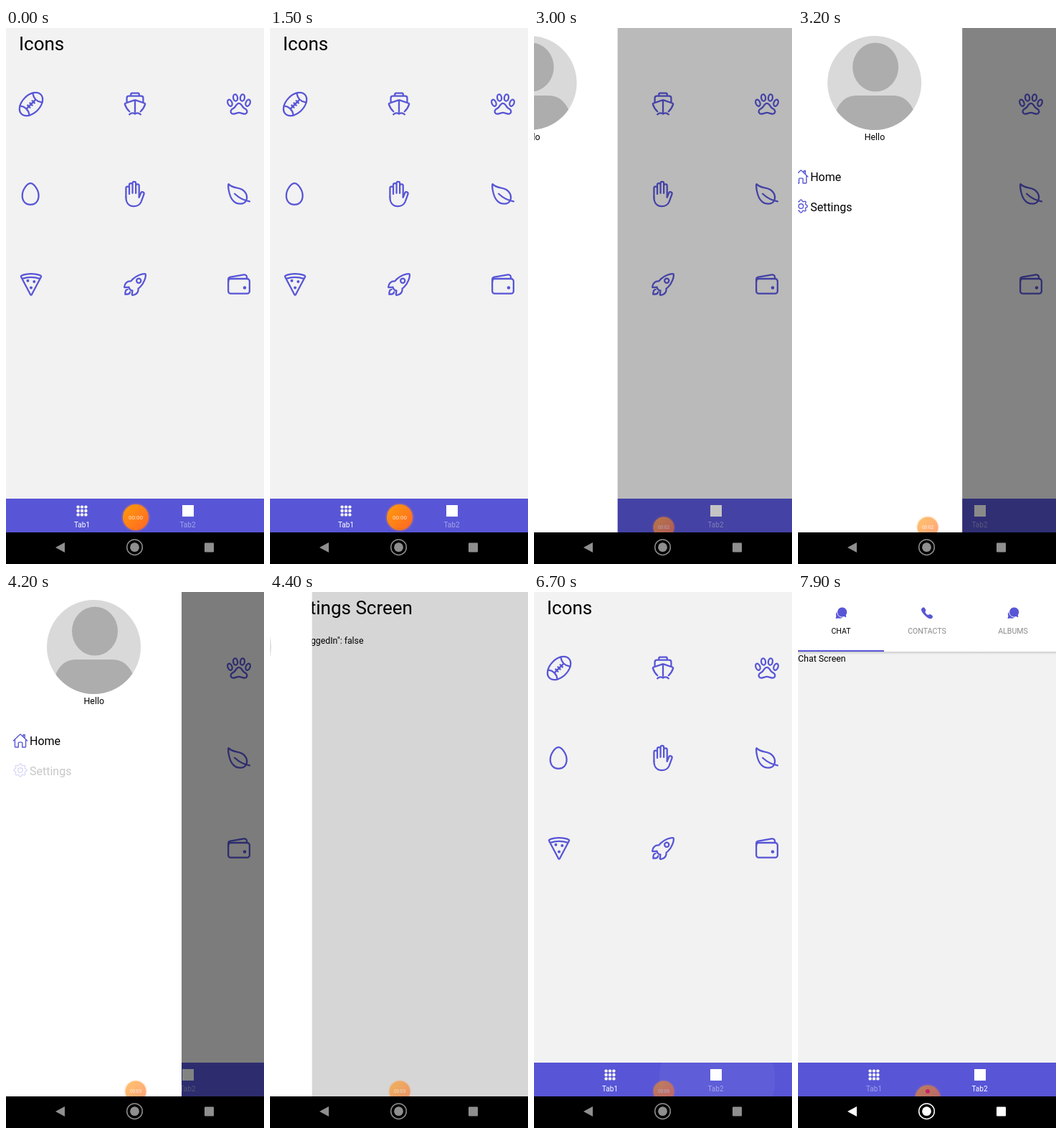
An HTML page that plays this animation: 360x746 px, repeating every 8000 ms.

```html
<!DOCTYPE html>
<html lang="en">
<head>
<meta charset="utf-8">
<title>App tour</title>
<style>
  html, body { margin: 0; width: 100%; height: 100%; overflow: hidden; background: #000; }
  svg { display: block; font-family: Roboto, sans-serif; }
  text { white-space: pre; }
  .icon { fill: none; stroke: #5856d6; stroke-width: 32; stroke-linecap: round; stroke-linejoin: round; }
  .dot { fill: #5856d6; stroke: none; }
  .mid { text-anchor: middle; }
</style>
</head>
<body>
<svg width="360" height="746" viewBox="0 0 360 746">
  <defs>
    <linearGradient id="orange" x1="0" y1="0" x2="1" y2="1">
      <stop offset="0" stop-color="#ff9d0a"/><stop offset="1" stop-color="#ff6526"/>
    </linearGradient>
    <linearGradient id="shade" x1="0" y1="0" x2="0" y2="1">
      <stop offset="0" stop-color="#000" stop-opacity=".16"/><stop offset="1" stop-color="#000" stop-opacity="0"/>
    </linearGradient>
    <clipPath id="app"><rect width="360" height="702"/></clipPath>
    <clipPath id="bar"><rect y="655" width="360" height="47"/></clipPath>
    <clipPath id="face"><circle cx="122.5" cy="76.5" r="65.5"/></clipPath>
  </defs>

  <g clip-path="url(#app)">
    <rect width="360" height="702" fill="#f2f2f2"/>

    <g id="icons"><text x="18" y="31" font-size="26">Icons</text></g>

    <g id="settings">
      <text x="18" y="31" font-size="26">Settings Screen</text>
      <g font-size="12.3">
        <text x="18" y="57">{</text>
        <text x="30" y="71.5">"isLoggedIn": false</text>
        <text x="18" y="86">}</text>
      </g>
    </g>

    <g id="chat">
      <rect width="360" height="83" fill="#fff"/>
      <rect y="83" width="360" height="4" fill="url(#shade)"/>
      <rect y="81" width="120" height="2" fill="#5856d6"/>
      <g id="topTabs" class="mid" font-size="10.6"></g>
      <text y="96.5" font-size="12.4">Chat Screen</text>
    </g>

    <g id="tabBar">
      <rect y="655" width="360" height="47" fill="#5856d6"/>
      <g clip-path="url(#bar)"><circle id="ripple" cx="255.5" cy="679" fill="#fff"/></g>
      <g id="grid" fill="#fff"></g>
      <rect x="246" y="664" width="16" height="16" fill="#fff"/>
      <g class="mid" font-size="10" fill="#fff">
        <text id="tab1" x="106" y="695">Tab1</text>
        <text id="tab2" x="253.5" y="695">Tab2</text>
      </g>
    </g>

    <rect id="scrim" width="360" height="702"/>

    <g id="drawer">
      <rect width="245" height="702" fill="#fff"/>
      <g clip-path="url(#face)">
        <rect x="56" y="10" width="134" height="134" fill="#d9d9d9"/>
        <ellipse cx="124" cy="54.5" rx="32" ry="34" fill="#adadad"/>
        <path d="M62 146C66 112 76 94 98 94h50c22 0 32 18 38 52z" fill="#adadad"/>
      </g>
      <text class="mid" x="122.8" y="156" font-size="12.4">Hello</text>
      <g id="homeItem"><text x="33" y="213" font-size="16">Home</text></g>
      <g id="settingsItem"><text x="33" y="255" font-size="16">Settings</text></g>
    </g>

    <g id="bubble">
      <circle r="20" fill="#ff8a3c" opacity=".22"/>
      <circle r="18" fill="url(#orange)"/>
      <text id="clock" class="mid" y="2.8" font-size="8" fill="#fff" fill-opacity=".8"></text>
    </g>
    <circle id="stop" cx="181" cy="695" r="3" fill="#c22464"/>
  </g>

  <rect y="702" width="360" height="44"/>
  <rect id="press" x="30" y="702" width="92" height="42" rx="21" fill="#222"/>
  <g id="nav" fill="#fff">
    <path d="M69 723l13-7v14z"/>
    <circle cx="179.5" cy="722.7" r="10.8" fill="none" stroke="#fff" stroke-width="1.5"/>
    <circle cx="179.5" cy="722.7" r="6.4"/>
    <rect x="277" y="716.5" width="13" height="13" rx="1"/>
  </g>
</svg>

<script>
const $ = id => document.getElementById(id);
const set = (id, attrs) => { for (const k in attrs) $(id).setAttribute(k, attrs[k]); };
const add = (id, markup) => $(id).insertAdjacentHTML('beforeend', markup);
const path = d => `<path d="${d}"/>`;
const dot = (x, y, r) => `<circle class="dot" cx="${x}" cy="${y}" r="${r}"/>`;
const oval = (x, y, rx, ry, turn) =>
  `<ellipse cx="${x}" cy="${y}" rx="${rx}" ry="${ry}" transform="rotate(${turn} ${x} ${y})"/>`;

// Icons are drawn on a 512 unit square and placed by their centre.
const icon = (shape, x, y, size) =>
  `<g class="icon" transform="translate(${x} ${y}) scale(${size / 512}) translate(-256 -256)">${shape}</g>`;

const shapes = [
  // football
  oval(256, 256, 267.6, 173.4, -45) +
    path('M334 178L178 334M323 234l-45-45M278 278l-44-44M234 323l-45-45M288 40Q312 200 472 224M40 288Q200 312 224 472'),
  // boat
  path('M176 96V62a22 22 0 0 1 22-22h116a22 22 0 0 1 22 22v34M96 212V136a40 40 0 0 1 40-40h240a40 40 0 0 1 40 40v76') +
    path('M148 400C96 350 70 300 58 258q-4-14 10-19L246 178q10-3 20 0l178 61q14 5 10 19c-12 42-38 92-90 142M256 180v230') +
    path('M146 456q55-46 110-10 55-36 110 10'),
  // paw
  oval(80, 232, 41, 66, -22) + oval(187, 130, 42, 66, -8) + oval(325, 130, 42, 66, 8) + oval(432, 232, 41, 66, 22) +
    path('M328 303C300 257 288 240 256 240s-44 17-72 63c-24 40-72 43-84 77-12 32 11 68 43 68 32 0 75-25 113-25s81 25 113 25 54-36 42-68c-12-34-59-37-83-77z'),
  // egg
  path('M244 48C180 48 84 172 84 288s72 176 160 176 160-60 160-176S308 48 244 48z'),
  // hand
  path('M80 320V144a32 32 0 0 1 64 0v112M144 256V80a32 32 0 0 1 64 0v160M272 241V96a32 32 0 0 1 64 0v224M208 240V48a32 32 0 0 1 64 0v192') +
    path('M80 320c0 117 64 176 152 176s124-40 144-88l53-144c7-18 3-35-12-44s-36-4-44 12l-37 88'),
  // leaf
  path('M322 171C233 114 141 155 56 65c-20-21-8 236 98 333 78 71 198 63 238-6s19-163-70-221zM173 253c86 81 175 129 292 147'),
  // pizza
  path('M256 48C180 48 110 62 66 86q-12 6-6 20L240 446q16 28 32 0L452 106q6-14-6-20C402 62 332 48 256 48zM86 142Q256 84 426 142') +
    dot(192, 184, 28) + dot(316, 200, 28) + dot(256, 318, 28),
  // rocket
  path('M462 54q-1-3-4-4c-54-13-180 34-248 103a295 295 0 0 0-33 39c-21-2-42 0-60 7-50 22-65 80-69 105q0 10 10 11l81-9q0 9 1 18 1 7 5 11l32 32q5 4 11 5 9 1 18 1l-9 81q1 10 10 10c25-4 83-19 105-69 8-18 10-39 8-60a294 294 0 0 0 39-33c69-68 116-191 103-248z') +
    '<circle cx="329" cy="183" r="43"/>' + path('M110 352q-16 2-27 13c-17 17-19 83-19 83s66-2 83-19q11-11 13-27'),
  // wallet
  '<rect x="48" y="144" width="416" height="288" rx="48"/>' +
    path('M411 144v-30a50 50 0 0 0-59-49L89 110a50 50 0 0 0-41 49v49') + dot(368, 320, 32)
];
shapes.forEach((s, i) => add('icons', icon(s, [35, 180, 325][i % 3], [106, 231, 357][i / 3 | 0], 36.6)));

const house = path('M80 212v236a16 16 0 0 0 16 16h96V328a24 24 0 0 1 24-24h80a24 24 0 0 1 24 24v136h96a16 16 0 0 0 16-16V212M480 256L267 52q-11-8-22 0L32 256M400 179V64h-48v69');
const cogPoints = Array.from({ length: 32 }, (_, i) => {
  const a = (i - 0.5) * Math.PI / 16, r = i % 4 < 2 ? 208 : 164;
  return `${256 + r * Math.cos(a)},${256 + r * Math.sin(a)}`;
});
const cog = `<polygon points="${cogPoints.join(' ')}"/><circle cx="256" cy="256" r="76"/>`;
add('homeItem', icon(house, 20, 207, 22));
add('settingsItem', icon(cog, 20, 248, 22));

for (let i = 0; i < 9; i++)
  add('grid', `<circle cx="${100.6 + i % 3 * 5.4}" cy="${666.6 + (i / 3 | 0) * 5.4}" r="2.2"/>`);

const balloons = x => `<g transform="translate(${x} 29)" fill="#5856d6">
  <path d="M-7.5 8l.8-3.5A5.6 5.6 0 1 1-3 7.6z"/>
  <path d="M8 7L7.4 3A7 7 0 1 0 4 5.6z" stroke="#fff" stroke-width="1"/></g>`;
const phone = `<path fill="#5856d6" transform="translate(180 29.3) scale(.036) translate(-256 -256)"
  d="M391 480C300 480 40 260 32 120c2-40 48-80 88-88 40-4 90 90 90 126 0 30-32 40-24 60 12 44 70 100 114 112 22 6 30-24 58-24 34 0 124 46 122 92-6 40-50 82-89 82z"/>`;
add('topTabs', balloons(60) + phone + balloons(300));
['CHAT', 'CONTACTS', 'ALBUMS'].forEach((name, i) =>
  add('topTabs', `<text x="${60 + 120 * i}" y="57.8" fill="${i ? '#8a8a8a' : '#000'}">${name}</text>`));

// Steps are [time, value] pairs, joined by straight lines.
const tracks = {
  drawer: [[2640, 0], [2700, 12], [2800, 36], [2900, 72], [3000, 116], [3100, 180], [3200, 229], [3300, 245],
    [4220, 245], [4300, 150], [4400, 59], [4500, 22], [4600, 8], [4750, 0]],
  bubbleY: [[1850, 681], [2200, 695], [7550, 695], [7850, 704]],
  bubbleR: [[1850, 18], [2200, 14.6], [7550, 14.6], [7850, 17.5]],
  bubbleAlpha: [[1850, 1], [2200, .6]],
  rippleR: [[6440, 20], [6650, 81]],
  rippleAlpha: [[6440, 0], [6500, .2], [6600, .16], [6740, 0]],
  press: [[5240, 0], [5300, 1], [5550, 1], [5900, 0]],
  light: [[5250, .56], [5500, .95], [5600, 1], [5750, 1], [6000, .56], [7550, .56], [7800, 1]]
};

function at(name, t) {
  const steps = tracks[name];
  const i = steps.findIndex(s => s[0] > t);
  if (i < 0) return steps[steps.length - 1][1];
  if (i === 0) return steps[0][1];
  const [t0, a] = steps[i - 1], [t1, b] = steps[i];
  return a + (b - a) * (t - t0) / (t1 - t0);
}

const show = (id, on) => set(id, { visibility: on ? 'visible' : 'hidden' });

function draw(t) {
  const inSettings = t >= 4260 && t < 5370, inChat = t >= 7080;
  show('icons', !inSettings && !inChat);
  show('settings', inSettings);
  show('chat', inChat);
  show('tabBar', !inSettings);
  set('tab1', { opacity: inChat ? .45 : 1 });
  set('tab2', { opacity: inChat ? 1 : .45 });

  const open = at('drawer', t);
  set('drawer', { transform: `translate(${open - 245} 0)` });
  set('scrim', { opacity: open / 245 * .49 });
  set('settingsItem', { opacity: t >= 4180 ? .22 : 1 });

  set('ripple', { r: at('rippleR', t), opacity: at('rippleAlpha', t) });
  set('press', { opacity: at('press', t) });
  set('nav', { opacity: at('light', t) });

  set('bubble', {
    transform: `translate(181 ${at('bubbleY', t)}) scale(${at('bubbleR', t) / 18})`,
    opacity: at('bubbleAlpha', t)
  });
  $('clock').textContent = t < 7600 ? '00:0' + Math.max(0, Math.floor((t - 600) / 1000)) : '';
  show('stop', t >= 7700);
}

const start = performance.now();
function tick() {
  draw((performance.now() - start) % 8000);
  requestAnimationFrame(tick);
}
tick();
</script>
</body>
</html>
```
